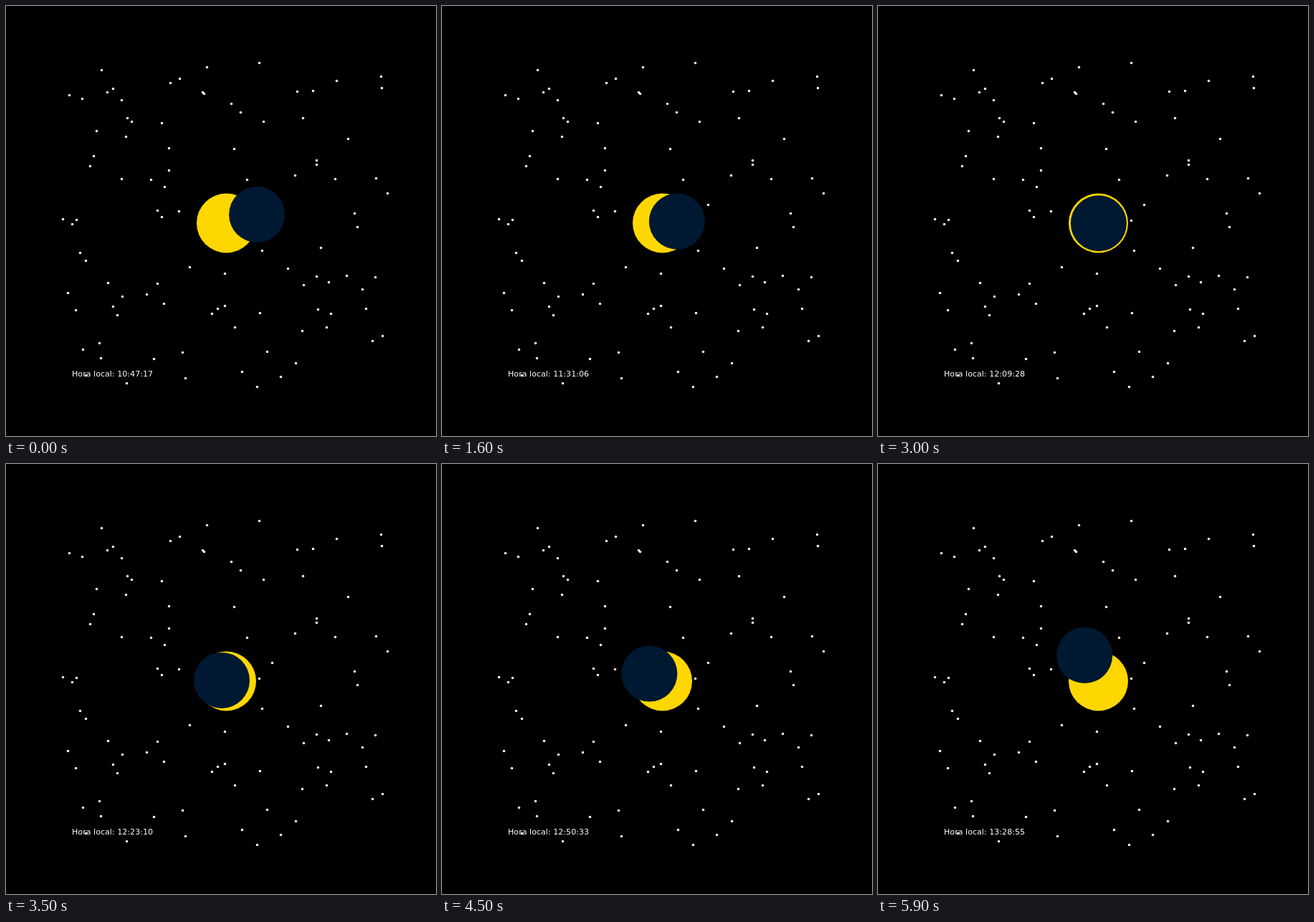
Recreate the animation shown at these times as an HTML page with a canvas. Size 600x600 px, loop 6000 ms.

```html
<!DOCTYPE html>
<html lang="es">
<head>
<meta charset="utf-8">
<style>
html, body { margin: 0; width: 100%; height: 100%; overflow: hidden; background: #000; }
canvas { display: block; }
</style>
</head>
<body>
<canvas id="sky" width="600" height="600"></canvas>
<script>
const ctx = document.getElementById('sky').getContext('2d');
const FRAMES = 60, FRAME_MS = 100;
const START_SECONDS = 10 * 3600 + 47 * 60 + 17, SPAN_SECONDS = 9698;

// Plot area: a square with its origin at the lower left
const LEFT = 76.5, BOTTOM = 534, SIZE = 462;

// Moon centre every KNOT_STEP frames, starting one knot before the first frame
const KNOT_STEP = 7;
const MOON_X = [359.8, 350.1, 340.4, 330.7, 320.7, 310.7, 301, 292.1, 286.9, 286.6, 292, 302.7];
const MOON_Y = [285.2, 291, 295.8, 299.6, 302.2, 303.3, 301.9, 296.3, 286.6, 273.4, 258.2, 242];

// Mersenne Twister, returning 53-bit doubles in [0, 1)
function makeRandom(seed) {
  const N = 624, mt = new Uint32Array(N);
  mt[0] = seed;
  for (let i = 1; i < N; i++) {
    mt[i] = Math.imul(1812433253, mt[i - 1] ^ (mt[i - 1] >>> 30)) + i;
  }
  let index = N;
  function next() {
    if (index === N) {
      for (let k = 0; k < N; k++) {
        const y = (mt[k] & 0x80000000) | (mt[(k + 1) % N] & 0x7fffffff);
        mt[k] = mt[(k + 397) % N] ^ (y >>> 1) ^ (y & 1 ? 0x9908b0df : 0);
      }
      index = 0;
    }
    let y = mt[index++];
    y ^= y >>> 11;
    y ^= (y << 7) & 0x9d2c5680;
    y ^= (y << 15) & 0xefc60000;
    y ^= y >>> 18;
    return y >>> 0;
  }
  return () => {
    const high = next() >>> 5, low = next() >>> 6;
    return (high * 67108864 + low) / 9007199254740992;
  };
}

// Stars sit on pixel centres
const random = makeRandom(42);
const starX = Array.from({ length: 100 }, () => Math.round(LEFT + SIZE * random()) + 0.5);
const starY = Array.from({ length: 100 }, () => Math.round(BOTTOM - SIZE * random()) + 0.5);

// Catmull-Rom interpolation
function along(knots, frame) {
  const i = Math.floor(frame / KNOT_STEP), t = frame / KNOT_STEP - i;
  const [a, b, c, d] = knots.slice(i, i + 4);
  return b + 0.5 * t * (c - a + t * (2 * a - 5 * b + 4 * c - d + t * (3 * (b - c) + d - a)));
}

function disc(x, y, radius, color) {
  ctx.fillStyle = color;
  ctx.beginPath();
  ctx.arc(x, y, radius, 0, 2 * Math.PI);
  ctx.fill();
}

function clock(frame) {
  const s = START_SECONDS + Math.floor(frame * SPAN_SECONDS / (FRAMES - 1));
  return [s / 3600, s / 60 % 60, s % 60]
    .map(v => String(Math.floor(v)).padStart(2, '0')).join(':');
}

function draw(frame) {
  ctx.fillStyle = '#000';
  ctx.fillRect(0, 0, 600, 600);
  starX.forEach((x, i) => disc(x, starY[i], 1.74, '#fff'));
  disc(307.5, 303, 41.5, '#ffd700');
  disc(along(MOON_X, frame), along(MOON_Y, frame), 39, '#001932');
  ctx.fillStyle = '#fff';
  ctx.font = '11.11px "DejaVu Sans", sans-serif';
  ctx.fillText('Hora local: ' + clock(frame), 92, 517);
}

const start = performance.now();
function tick() {
  draw(Math.floor((performance.now() - start) / FRAME_MS) % FRAMES);
  requestAnimationFrame(tick);
}
tick();
</script>
</body>
</html>
```
